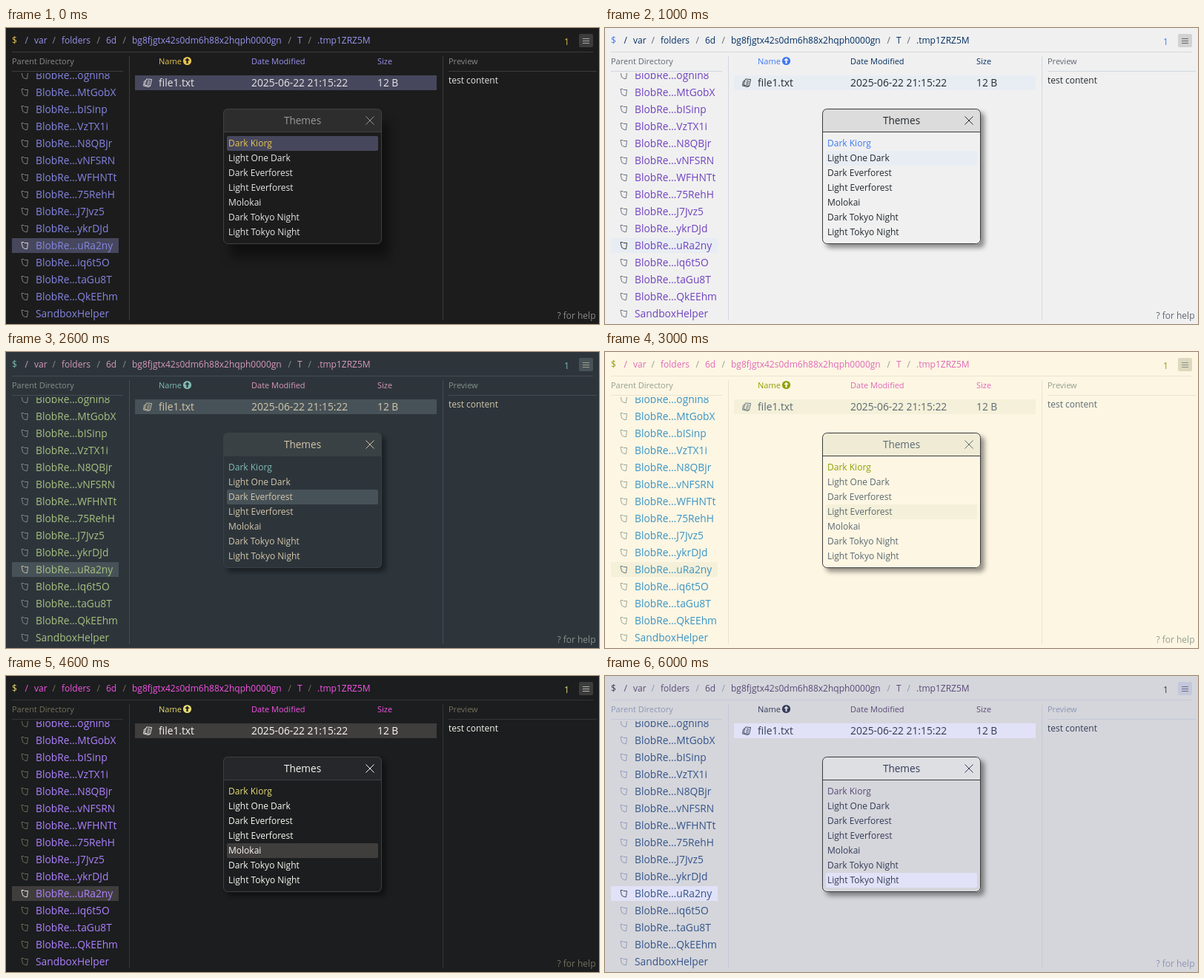
An HTML page that plays this animation: 800x400 px, repeating every 7000 ms.

```html
<!DOCTYPE html>
<html lang="en">
<head>
<meta charset="utf-8">
<title>Theme picker</title>
<style>
  html, body { margin: 0; width: 100%; height: 100%; overflow: hidden; }
  svg { display: block; width: 800px; height: 400px; background: var(--bg); }
  text { font-family: "Open Sans", "Noto Sans", sans-serif; white-space: pre; }
  .fg { fill: var(--fg); }
  .dim { fill: var(--dim); }
  .accent { fill: var(--accent); }
  .current { fill: var(--current); }
  .dir { fill: var(--dir); }
  .link { fill: var(--link); }
  .title { fill: var(--title); }
  .bg { fill: var(--bg); }
  .sel { fill: var(--sel); }
  .bar { fill: var(--bar); }
  .button { fill: var(--button); }
  .menu { fill: var(--fg); opacity: .65; }
  .line { fill: var(--line); }
  .edge { fill: none; stroke: var(--edge); }
  .icon { fill: none; stroke: var(--dim); stroke-width: .9; stroke-linejoin: round; }
  .icon.on { stroke: var(--fg); }
  .close { fill: none; stroke: var(--title); stroke-width: 1; }
  .shadow { fill: var(--bg); filter: var(--shadow); }
</style>
</head>
<body>
<svg id="stage" viewBox="0 0 800 400">
  <defs><clipPath id="list"><rect x="0" y="61" width="166" height="335"/></clipPath></defs>
</svg>
<script>
const STEP = 1000, SMALL = 12, HEAD = 11, BODY = 13.8;

const keys = ["bg", "fg", "dim", "accent", "dir", "link", "sel", "line", "bar", "edge", "button"];
const softShadow = "drop-shadow(5px 5px 3px rgba(0,0,0,.42))";
const themes = [
  { name: "Dark Kiorg", colors: "#1c1c1c #e6e6e6 #8a8a8a #e5c453 #8585e2 #9a92ee #46475c #3c3c3c #2d2d2d #414141 #3c3c3c",
    title: "#9a9a9a", shadow: "drop-shadow(10px 18px 7px rgba(0,0,0,.42))" },
  { name: "Light One Dark", colors: "#f0f0f0 #24292e #5f6673 #4078f2 #6f42c1 #032f62 #e8edf4 #d3d8e0 #dcdcdc #3c3c3c #d2d2d2" },
  { name: "Dark Everforest", colors: "#2d353b #d3c6aa #859289 #7fbbb3 #a7c080 #d699b6 #475258 #434d53 #3a4145 #3a4145 #475258" },
  { name: "Light Everforest", colors: "#fdf6e3 #5c6a72 #939f91 #8da101 #3a94c5 #df69ba #f4f0d9 #e8e4d0 #efebd4 #3c3c3c #ddd8be" },
  { name: "Molokai", colors: "#1b1d1e #f8f8f2 #75715e #e6db74 #ae81ff #f553e6 #403d3d #353535 #25272a #414141 #3c3c3c" },
  { name: "Dark Tokyo Night", colors: "#1a1b26 #c0caf5 #565f89 #c0caf5 #7aa2f7 #bb9af7 #2d3f76 #292e42 #1f2335 #414141 #292e42", current: "#bb9af7" },
  { name: "Light Tokyo Night", colors: "#d5d6db #343b58 #8c96b8 #343b58 #34548a #5a4a78 #e1e2f8 #c4c8da #dedfe3 #3c3c3c #c4c8da", current: "#5a4a78" },
];

const stage = document.getElementById("stage");

function add(tag, attrs, parent = stage) {
  const node = document.createElementNS("http://www.w3.org/2000/svg", tag);
  for (const k in attrs) node.setAttribute(k, attrs[k]);
  return parent.appendChild(node);
}
const rect = (x, y, width, height, cls, rx = 0, parent) =>
  add("rect", { x, y, width, height, rx, class: cls }, parent);
const path = (d, cls, x = 0, y = 0, parent) =>
  add("path", { d, class: cls, transform: `translate(${x} ${y})` }, parent);

// Places text by the middle of its capitals.
function label(str, x, mid, cls, size = SMALL, parent, anchor = "start") {
  const node = add("text", { x, y: mid + size * 0.357, class: cls, "font-size": size, "text-anchor": anchor }, parent);
  node.textContent = str;
}

function drawPathBar() {
  label("$", 8, 17, "accent");
  label("/", 25.5, 17, "link");
  const crumbs = [["var", 38], ["folders", 75], ["6d", 135],
    ["bg8fjgtx42s0dm6h88x2hqph0000gn", 170], ["T", 393], [".tmp1ZRZ5M", 420]];
  crumbs.forEach(([name, x], i) => {
    if (i) label("/", x - 12.5, 17, "dim");
    label(name, x, 17, "link");
  });
  label("1", 753, 18.5, "accent");
  rect(773, 8, 19, 18, "button", 2);
  for (const y of [14, 17, 20]) rect(778, y, 9, 1, "menu");
  rect(8, 32, 784, 1, "line");
}

function drawParent() {
  label("Parent Directory", 8, 45, "dim", HEAD);
  const g = add("g", { "clip-path": "url(#list)" });
  const tails = "oghlh8 MtGobX bISinp VzTX1i N8QBjr vNFSRN WFHNTt 75RehH J7Jvz5 ykrDJd uRa2ny iq6t5O taGu8T QkEEhm";
  const names = [...tails.split(" ").map(t => "BlobRe…" + t), "SandboxHelper"];
  names.forEach((name, i) => {
    const mid = 64 + 23 * i, on = i === 10;
    if (on) rect(8, mid - 10, 144, 20, "sel", 0, g);
    path("M1-4.5H4L5-3.5H9.5L8.5 4.5H6L2.5 2.5Z", on ? "icon on" : "icon", 20, mid, g);
    label(name, 40, mid, "dir", BODY, g);
  });
}

function drawFiles() {
  label("Name", 206, 45, "accent", HEAD);
  add("circle", { cx: 244.5, cy: 44.5, r: 5.6, class: "accent" });
  path("M0-4 3.2-.4H1.1V3.5H-1.1V-.4H-3.2Z", "bg", 244.5, 44.5);
  label("Date Modified", 331, 45, "link", HEAD);
  label("Size", 501, 45, "link", HEAD);
  rect(174, 64, 407, 20, "sel");
  path("M3.5-5 10.5-4.5 8.5 4.5 1 3Z M2.5-3 .5-2-.5 4 6 5.5 8.5 4.5 M5-2.5 8.5-2 M4.5-.5 8 0 M4 1.5 7.5 2", "icon on", 186, 74);
  label("file1.txt", 206, 74, "fg", BODY);
  label("2025-06-22 21:15:22", 331, 74, "fg", BODY);
  label("12 B", 501, 74, "fg", BODY);
}

function drawPreview() {
  label("Preview", 597, 45, "dim", HEAD);
  label("test content", 597, 70.5, "fg");
  label("? for help", 795.5, 388.5, "dim", SMALL, stage, "end");
}

function drawDividers() {
  for (const [x, w] of [[8, 150], [597, 200]]) rect(x, 58, w, 1, "line");
  for (const x of [166, 589]) rect(x, 38, 1, 357, "line");
}

function drawPopup() {
  rect(293, 109, 214, 183, "shadow", 6);
  path("M293 141V115a6 6 0 0 1 6-6H501a6 6 0 0 1 6 6V141Z", "bar");
  path("M293 140.5H507", "edge");
  rect(293.5, 109.5, 213, 182, "edge", 6);
  label("Themes", 400, 125, "title", 13.6, stage, "middle");
  path("M-5.5-5.5 5.5 5.5M5.5-5.5-5.5 5.5", "close", 491, 125);
  const cursor = rect(298, 146, 204, 20, "sel", 2);
  themes.forEach((t, i) => label(t.name, 300, 155.5 + 20 * i, i ? "fg" : "current"));
  return cursor;
}

drawPathBar();
drawParent();
drawFiles();
drawPreview();
drawDividers();
const cursor = drawPopup();

let shown = -1;
function apply(i) {
  const t = themes[i], set = (k, v) => stage.style.setProperty("--" + k, v);
  const colors = t.colors.split(" ");
  keys.forEach((k, n) => set(k, colors[n]));
  set("current", t.current || colors[keys.indexOf("accent")]);
  set("title", t.title || colors[keys.indexOf("fg")]);
  set("shadow", t.shadow || softShadow);
  cursor.setAttribute("y", 146 + 20 * i);
  shown = i;
}

const start = performance.now();
function tick() {
  const i = Math.floor((performance.now() - start) / STEP) % themes.length;
  if (i !== shown) apply(i);
  requestAnimationFrame(tick);
}
tick();
</script>
</body>
</html>
```
